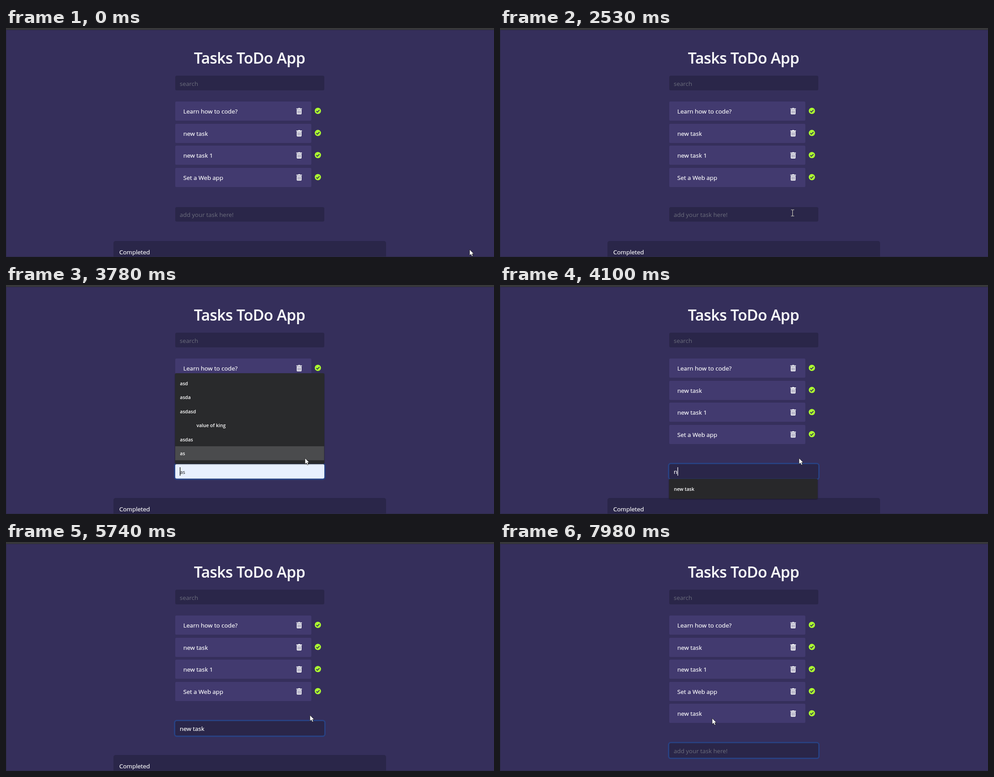
An HTML page for the animation above (8000 ms loop, 1090 by 514 pixels).

```html
<!DOCTYPE html>
<html lang="en">
<head>
<meta charset="utf-8">
<title>Tasks ToDo App</title>
<style>
html, body { margin: 0; width: 100%; height: 100%; overflow: hidden; background: #352f5b; }
svg { display: block; }
text { font: 13.4px "Open Sans", "Noto Sans", sans-serif; fill: #fff; stroke: #fff; stroke-width: .2px; white-space: pre; }
.title { font-size: 34px; font-weight: 600; letter-spacing: -.45px; fill: #f8f9fa; text-anchor: middle; }
.hint { fill: #6c6e7d; stroke: none; }
.field { fill: #2a2649; }
.option { font-size: 10.6px; font-weight: 600; stroke: none; }
.preview { font-size: 11.2px; fill: #111; stroke: none; }
.popup { filter: drop-shadow(0 1px 1px rgba(0, 0, 0, .4)); }
</style>
</head>
<body>
<svg width="1090" height="514" viewBox="0 0 1090 514">
  <defs>
    <g id="icons">
      <path d="M648.6 180.4h3.8l.7-.9h3.4l.7 .9h3.8v1.9h-12.4zM649.5 183h10.6v9.4q0 1.4-1.4 1.4h-7.8q-1.4 0-1.4-1.4z" fill="#f8f9fa"/>
      <path d="M652.1 185v6.6M654.8 185v6.6M657.5 185v6.6" stroke="#423a6f" stroke-width=".9" stroke-linecap="round"/>
      <circle cx="696.6" cy="186" r="7" fill="#adff2f"/>
      <path d="M693 186.3l2.5 2.5 4.7-4.9" fill="none" stroke="#352f5b" stroke-width="1.9"/>
    </g>
    <path id="bar" d="M-3.6-7H-1Q0-7 0-6V6Q0 7-1 7H-3.6M3.6-7H1Q0-7 0-6V6Q0 7 1 7H3.6"/>
  </defs>
  <rect width="1090" height="514" fill="#352f5b"/>
  <text class="title" x="544" y="80">Tasks ToDo App</text>
  <rect class="field" x="378" y="107" width="333" height="33" rx="3.5"/>
  <text class="hint" x="388" y="129.5">search</text>
  <g id="rows"></g>

  <g id="lower">
    <rect class="field" x="240" y="478" width="609" height="60" rx="5"/>
    <text x="253" y="508">Completed</text>
    <rect id="ring" fill="#284284"/>
    <rect id="input" x="378" y="402" width="333" height="32.6" rx="3.5"/>
    <text id="hint" class="hint" x="388" y="424">add your task here!</text>
    <text id="typed" x="388" y="424"></text>
    <text id="preview" class="preview" x="388.5" y="424">as</text>
    <rect id="caret" y="409" width="1.3" height="19"/>
  </g>

  <g id="history" class="popup">
    <rect x="377.5" y="198" width="333.5" height="203.5" rx="3" fill="#292a2c"/>
    <rect id="hover" x="378" y="362" width="332.5" height="31.4" fill="#4a4b4d"/>
  </g>
  <g id="match" class="popup">
    <rect x="377.5" y="435" width="332" height="45" rx="3" fill="#28282a"/>
    <text class="option" x="388.5" y="461.5">new task</text>
  </g>

  <rect width="1090" height="4" fill="#38383a"/>
  <rect y="4" width="1090" height="1" fill="#2d2a47"/>
  <path d="M.5 5V513.5H1090" fill="none" stroke="#2c2a46"/>

  <path id="arrow" d="M.4 .6V14.2L3.5 11.3L5.6 15.9L8 14.8L6 10.4H10Z" fill="#fff" stroke="#111" stroke-width=".8"/>
  <g id="beam" fill="none">
    <use href="#bar" stroke="#22203a" stroke-width="2"/>
    <use href="#bar" stroke="#dedbd0" stroke-width="1.1"/>
  </g>
</svg>
<script>
const LOOP = 8000;
const FOCUS = 2700, OPENED = 2780, TYPING = 4100, TYPED = 5210, ADDED = 5910;
const BLINK = 530;
const ROW_GAP = 49.6;
const $ = id => document.getElementById(id);

function set(el, attrs) {
  for (const name in attrs) el.setAttribute(name, attrs[name]);
  return el;
}

function add(parent, tag, attrs, text = "") {
  const el = set(document.createElementNS("http://www.w3.org/2000/svg", tag), attrs);
  el.textContent = text;
  return parent.appendChild(el);
}

const tasks = ["Learn how to code?", "new task", "new task 1", "Set a Web app", "new task"];
const rows = tasks.map((task, i) => {
  const row = add($("rows"), "g", {});
  const y = Math.round(165 + i * ROW_GAP);
  add(row, "rect", { x: 378, y, width: 304, height: 43, rx: 2.5, fill: "#423a6f" });
  add(row, "text", { x: 396, y: y + 27 }, task);
  add(row, "use", { href: "#icons", y: i * ROW_GAP });
  return row;
});

["asd", "asda", "asdasd", "value of king", "asdas", "as"].forEach((word, i) =>
  add($("history"), "text", { class: "option", x: word.includes(" ") ? 425.5 : 388.5, y: 225 + i * 31.4 }, word));

// Each move starts where the last one ended; via holds the other Bezier points.
const home = [1035, 496.5];
const moves = [
  { start: 70, gap: 70, steps: 10, via: [[800, 120], [480, -20], [492, 116]] },
  { start: 1900, gap: 78, steps: 9, via: [[430, 150], [735, 380], [653.5, 415]] },
  { start: 2850, gap: 73, steps: 4, via: [[667.5, 388]] },
  { start: 4710, gap: 90, steps: 2, via: [[678.5, 388]] },
  { start: 7080, gap: 79, steps: 11, via: [[464, 394]] },
  { start: 7980, gap: 20, steps: 1, via: [[473.5, 395]] }
];
const bursts = [
  { start: TYPING, gap: 100, text: "new " },
  { start: 4800, gap: (TYPED - 4800) / 3, text: "task" }
];

const smooth = p => p * p * (3 - 2 * p);
const mix = (a, b, p) => a + (b - a) * p;

// How many of a run's evenly timed steps have happened.
const stepsDone = (run, count, t) =>
  Math.max(0, Math.min(count, Math.floor((t - run.start) / run.gap + 1e-6) + 1));

function bezier(points, p) {
  while (points.length > 1) {
    points = points.slice(1).map((b, i) => b.map((v, k) => mix(points[i][k], v, p)));
  }
  return points[0];
}

const pointerAt = t => moves.reduce((from, move) =>
  bezier([from, ...move.via], smooth(stepsDone(move, move.steps, t) / move.steps)), home);

function typedAt(t) {
  if (t >= ADDED) return "";
  return bursts.map(b => b.text.slice(0, stepsDone(b, b.text.length, t))).join("");
}

// The blink restarts at focus and with each key.
function caretOn(t) {
  let reset = FOCUS;
  for (const b of bursts) {
    const keys = stepsDone(b, b.text.length, t);
    if (keys) reset = b.start + (keys - 1) * b.gap;
  }
  return t >= FOCUS && Math.floor((t - reset) / BLINK) % 2 === 0;
}

const pen = document.createElement("canvas").getContext("2d");
function textWidth(text) {
  pen.font = '13.4px "Open Sans", "Noto Sans", sans-serif';
  return pen.measureText(text).width;
}

const within = (x, y, left, top, right, bottom) => x >= left && x <= right && y >= top && y <= bottom;
const show = (id, on) => { $(id).style.display = on ? "" : "none"; };

function overText(x, y, shift) {
  if (within(x, y, 378, 107, 711, 140) || within(x, y, 420, 45, 668, 92)) return true;
  if (within(x, y, 378, 402 + shift, 711, 435 + shift)) return true;
  return tasks.some((task, i) => {
    const mid = 186.5 + i * ROW_GAP;
    return (i < 4 || shift) && within(x, y, 396, mid - 9, 396 + textWidth(task), mid + 9);
  });
}

function draw(t) {
  const added = t >= ADDED;
  const shift = added ? ROW_GAP : 0;
  const [x, y] = pointerAt(t);
  const typed = typedAt(t);
  const open = t >= OPENED && t < TYPING;
  const picked = open && y < 393;

  rows[4].style.display = added ? "" : "none";
  set($("lower"), { transform: `translate(0 ${shift})` });

  const glow = smooth(Math.min(1, Math.max(0, (t - FOCUS) / 150)));
  const spread = 2.8 * glow;
  set($("ring"), { x: 378 - spread, y: 402 - spread, width: 333 + 2 * spread,
    height: 32.6 + 2 * spread, rx: 3.5 + spread, opacity: glow });

  set($("input"), { fill: picked ? "#e8f0fe" : "#2a2649" });
  show("hint", !typed && !picked);
  show("preview", picked);
  $("typed").textContent = typed;
  show("caret", caretOn(t));
  set($("caret"), { x: 388.2 + textWidth(typed), fill: picked ? "#000" : "#fff" });

  show("history", open);
  show("hover", picked);
  show("match", t >= TYPING && t < TYPED);

  const beam = !(open && y < 401) && overText(x, y, shift);
  show("beam", beam);
  show("arrow", !beam);
  set($(beam ? "beam" : "arrow"), { transform: `translate(${x} ${y})` });
}

const begin = performance.now();
function frame() {
  draw((performance.now() - begin) % LOOP);
  requestAnimationFrame(frame);
}
frame();
</script>
</body>
</html>
```
